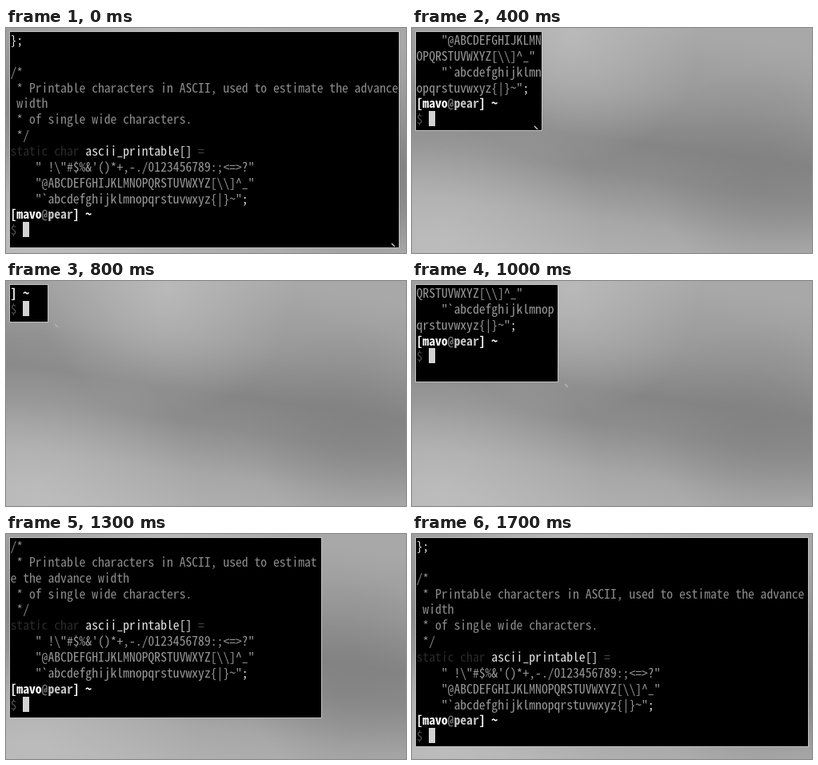
Write an HTML page with a canvas that moves like this. It is 500 px wide and 282 px high and loops after 1800 ms.

```html
<!DOCTYPE html>
<html lang="en">
<head>
<meta charset="utf-8">
<title>Terminal resize</title>
<style>
html, body { margin: 0; height: 100%; overflow: hidden; background: #999; }
canvas { display: block; }
</style>
</head>
<body>
<canvas id="stage" width="500" height="282"></canvas>
<script>
const ctx = document.getElementById('stage').getContext('2d');
const WIDTH = 500, HEIGHT = 282, STEP = 100;
const LEFT = 5, TOP = 5, CELL = 7.82, ROW = 19.85;
const INSET_X = 0.5, INSET_Y = 2;

const FONT = '15.64px "Noto Sans Mono CJK JP", "Noto Sans Mono", monospace';
const STYLES = {
  comment: ['#8c8c8c'],
  keyword: ['#2a2a2a'],
  operator: ['#444444'],
  code: ['#e4e4e4'],
  string: ['#989898'],
  prompt: ['#ffffff', 'bold'],
  at: ['#707070', 'bold'],
  host: ['#c4c4c4', 'bold'],
  dollar: ['#4c4c4c'],
};

const LINES = [
  [['};', 'code']],
  [],
  [['/*', 'comment']],
  [[' * Printable characters in ASCII, used to estimate the advance width', 'comment']],
  [[' * of single wide characters.', 'comment']],
  [[' */', 'comment']],
  [['static char ', 'keyword'], ['ascii_printable[]', 'code'], [' =', 'operator']],
  [['    " !\\"#$%&\'()*+,-./0123456789:;<=>?"', 'string']],
  [['    "@ABCDEFGHIJKLMNOPQRSTUVWXYZ[\\\\]^_"', 'string']],
  [['    "`abcdefghijklmnopqrstuvwxyz{|}~"', 'string'], [';', 'code']],
  [['[mavo', 'prompt'], ['@', 'at'], ['pear', 'host'], ['] ~', 'prompt']],
  [['$ ', 'dollar'], ['\0', 'code']],
].map(line => line.flatMap(([text, style]) => [...text].map(char => ({ char, style }))));

// Lower right corner of the window at each step of the drag
const CORNERS = [
  [491, 275], [426, 248], [339, 212], [245, 168], [162, 128], [106, 96],
  [70, 68], [47, 49], [52, 51], [102, 81], [182, 126], [265, 170],
  [335, 204], [394, 230], [440, 248], [472, 259], [488, 264], [495, 266],
];

function gradient(fill, stops) {
  stops.forEach(([at, color]) => fill.addColorStop(at, color));
  ctx.fillStyle = fill;
  ctx.fillRect(0, 0, WIDTH, HEIGHT);
}

function glow(x, y, radius, rgb, alpha) {
  gradient(ctx.createRadialGradient(x, y, 0, x, y, radius),
    [[0, `rgba(${rgb},${alpha})`], [1, `rgba(${rgb},0)`]]);
}

function drawWallpaper() {
  gradient(ctx.createLinearGradient(235, -10, 193, 290),
    [[0, '#a8a8a8'], [0.28, '#989898'], [0.48, '#858585'], [0.62, '#8d8d8d'], [0.82, '#a7a7a7'], [1, '#b2b2b2']]);
  glow(200, 10, 160, '194,194,194', 0.7);
  glow(40, 270, 200, '198,198,198', 0.5);
  glow(430, 180, 130, '126,126,126', 0.5);
}

// Breaks long lines at the column limit, as a terminal does
function wrap(columns) {
  return LINES.flatMap(line => {
    const rows = [];
    for (let i = 0; i === 0 || i < line.length; i += columns) {
      rows.push(line.slice(i, i + columns));
    }
    return rows;
  });
}

function drawCell({ char, style }, column, row) {
  const x = LEFT + INSET_X + column * CELL, y = TOP + row * ROW;
  const [color, weight = 'normal'] = STYLES[style];
  if (char === '\0') {
    ctx.fillStyle = '#d2d2d2';
    ctx.fillRect(Math.round(x), Math.round(y), 8, 19);
    return;
  }
  ctx.fillStyle = color;
  ctx.font = `${weight} ${FONT}`;
  ctx.fillText(char, x + CELL / 2, y + 16);
}

function drawWindow(right, bottom) {
  const width = right - LEFT, height = bottom - TOP;
  ctx.fillStyle = '#c0c0c0';
  ctx.fillRect(LEFT - 1, TOP - 1, width + 2, height + 2);
  ctx.fillStyle = '#000';
  ctx.fillRect(LEFT, TOP, width, height);

  ctx.save();
  ctx.beginPath();
  ctx.rect(LEFT, TOP, width, height);
  ctx.clip();
  ctx.textAlign = 'center';
  const columns = Math.floor((width - INSET_X) / CELL);
  const rows = Math.floor((height - INSET_Y) / ROW);
  wrap(columns).slice(-rows).forEach((cells, row) =>
    cells.forEach((cell, column) => drawCell(cell, column, row)));
  ctx.restore();
}

function drawPointer(x, y, color) {
  ctx.strokeStyle = color;
  ctx.lineWidth = 1.5;
  ctx.beginPath();
  ctx.moveTo(x - 2, y - 2);
  ctx.lineTo(x + 2, y + 2);
  ctx.stroke();
}

function draw() {
  const step = Math.floor(performance.now() / STEP) % CORNERS.length;
  const [right, bottom] = CORNERS[step];
  drawWallpaper();
  drawWindow(right, bottom);
  if (step < 7) drawPointer(right - 7, bottom - 3, '#c8c8c8');
  else if (step < 13) drawPointer(right + 11, bottom + 5, '#b4b4b4');
  requestAnimationFrame(draw);
}

draw();
</script>
</body>
</html>
```
